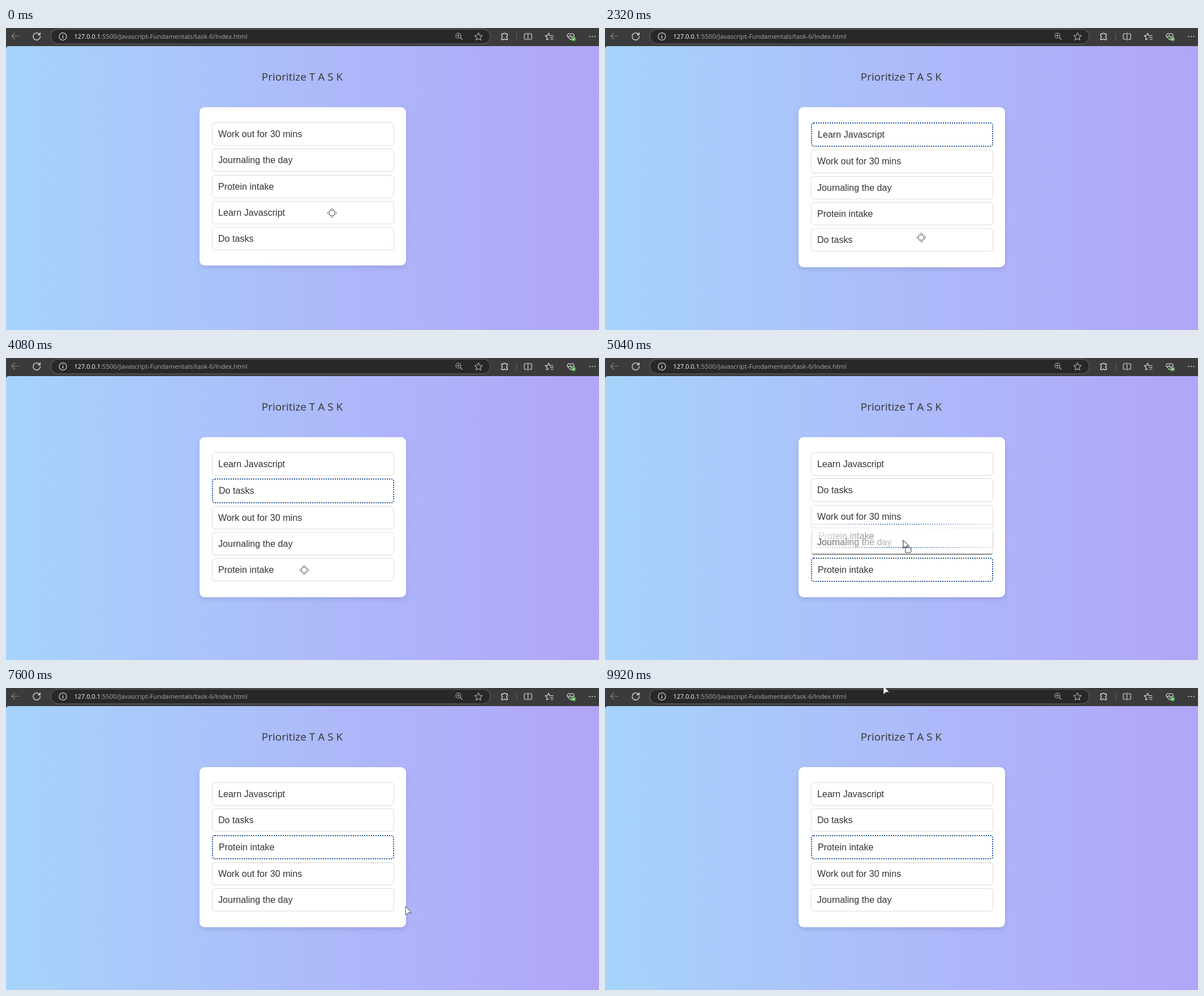
Animation of 1048x534 px, one loop 10 s. Source, as an HTML page:

```html
<!DOCTYPE html>
<html lang="en">
<head>
<meta charset="utf-8">
<title>Prioritize Task</title>
<style>
  html, body { margin: 0; width: 100%; height: 100%; overflow: hidden; background: #3b3b3b; }
  #stage { position: relative; width: 1048px; height: 534px; overflow: hidden; }
  #stage > * { position: absolute; }
  #page { left: 0; top: 32px; width: 1048px; height: 502px; border-radius: 5px 0 0 0;
    background: linear-gradient(to right, #a6d4fb, #adbbfa 50%, #b1a5f8); }
  #card { left: 342px; top: 140px; width: 365px; background: #fff; border-radius: 9px;
    box-shadow: 0 4px 9px rgba(0, 0, 0, .1); }
  .item { left: 364px; width: 321.5px; box-sizing: border-box; padding-left: 10px;
    border: 1px solid #dcdcdc; border-radius: 5px; background: #fff; color: #333;
    font: 16.1px/39px "Liberation Sans", Arial, sans-serif; white-space: pre; }
  .item.dragged { border: 2px dotted #1d5293; }
  .item.over { border-width: 0 1px 2px; border-bottom-color: #888; }
  svg { left: 0; top: 0; overflow: visible; }
  svg text { font-family: "Open Sans", sans-serif; }
  .icons { fill: none; stroke: #e6e6e6; stroke-width: 1.1; stroke-linecap: round; stroke-linejoin: round; }
</style>
</head>
<body>
<div id="stage">
  <div id="page"></div>
  <svg width="1048" height="534">
    <rect x="79" y="2" width="777" height="26" rx="13" fill="#282828" stroke="#6b6b6b"/>
    <text x="120.5" y="19" font-size="11" fill="#fff">127.0.0.1</text>
    <text x="167" y="19" font-size="11.35" fill="#a9a9a9">:5500/Javascript-Fundamentals/task-6/Index.html</text>
    <g class="icons">
      <path stroke="#858585" d="M23 14.5H10m5.500-5.500L10 14.500l5.500 5.500"/>
      <path stroke-width="1.3" d="M59.500 11.500A6.300 6.300 0 1 0 60.500 15M60.300 8.500v3.500h-3.500"/>
      <circle cx="100.500" cy="15" r="6.500"/>
      <path stroke-width="1.400" d="M100.500 14.500v3.500m0-6.200v.1"/>
      <g stroke="#b5b5b5">
        <circle cx="799.500" cy="13.500" r="4.500"/>
        <path d="M803 17l3.500 3.500M797.500 13.500h4m-2-2v4"/>
        <path d="M835 8.500l2 4.300 4.700.6-3.500 3.200.9 4.700-4.100-2.300-4.100 2.300.9-4.700-3.500-3.200 4.700-.6z"/>
      </g>
      <path stroke-width="1.300" d="M876 10.500h3a2.100 2.100 0 0 1 4 0h3v3.300a2 2 0 0 0 0 3.800v3.100h-3.200a2 2 0 0 0-3.700 0H876v-3.200a2 2 0 0 0 0-3.700z"/>
      <path stroke="#646464" d="M902.500 10v11"/>
      <path d="M920.500 10h-3a1.500 1.500 0 0 0-1.500 1.500v7a1.500 1.500 0 0 0 1.500 1.500h3M924.500 10h3a1.500 1.500 0 0 1 1.500 1.500v7a1.500 1.500 0 0 1-1.500 1.500h-3M922.500 8.500v13"/>
      <path d="M961 13.500l-1.800-4.500-1.900 3.900-4.300.6 3.200 3-.8 4.500 3.600-2M961.500 13.500h5.500m-5.500 3.300h5.500m-4 3.200h4"/>
      <path d="M998 20.800l-5-5a3.500 3.500 0 0 1 5-5 3.500 3.500 0 0 1 5 5zM992.500 15h3l1.500-2 2 4 1.500-2h3"/>
      <circle cx="1003" cy="19.500" r="4" fill="#4fa64d" stroke="none"/>
      <path stroke="#fff" d="M1001.200 19.600l1.300 1.300 2.300-2.500"/>
      <path stroke-width="2" d="M1031.500 15h.01m4.500 0h.01m4.500 0h.01"/>
    </g>
    <text x="451.800" y="93.400" font-size="19" fill="#333">Prioritize T A S K</text>
  </svg>
  <div id="card"></div>
  <svg id="pointer" width="1" height="1" style="z-index:3">
    <path id="arrow" d="M0 0V15.500L4.300 11.500H10.500Z" fill="#fff" stroke="#444"/>
    <g id="drag" fill="#fff" stroke="#111">
      <path d="M0 0v14.500l3.200-3 2.300 5 2.400-1.100-2.200-4.800h4.600z"/>
      <rect x="3.800" y="13.300" width="10" height="9" rx="1.500" stroke-width="1.300" stroke-dasharray="1.700 1"/>
    </g>
    <g id="move" fill="#fff" stroke="#666">
      <rect x="-4.500" y="-4.500" width="9" height="9" rx="2.500" stroke="#bbb"/>
      <path d="M0-8.500l3.300 4h-6.600zM0 8.500l3.300-4h-6.600zM-8.500 0l4-3.300v6.600zM8.500 0l-4-3.300v6.600z"/>
    </g>
  </svg>
</div>
<script>
const LOOP = 10000, STEP = 80;
const TOP = 167, GAP = 5.05, HEIGHT = { '': 41.2, dragged: 43.4, over: 41.9 };
const START_ORDER = ['Work out for 30 mins', 'Journaling the day', 'Protein intake', 'Learn Javascript', 'Do tasks'];
const DRAGS = [
  { name: 'Learn Javascript', start: 120, end: 850, slot: 0 },
  { name: 'Do tasks', start: 2450, end: 3300, slot: 1 },
  { name: 'Protein intake', start: 4500, end: 6350, slot: 2 }
];
// Pointer stops: time, x, y
const STOPS = [
  [0, 576, 327], [120, 576, 326], [560, 580, 185], [1200, 580, 187], [2000, 559, 370.5],
  [2400, 559, 370.5], [2450, 559, 372], [3000, 553, 230], [3500, 553, 232], [4160, 526, 381],
  [4500, 526, 381], [5040, 527, 322], [5200, 527, 285], [6500, 528, 283],
  [7200, 706, 386], [8200, 706, 386], [9300, 492, -4], [LOOP, 492, -4]
];

const $ = id => document.getElementById(id);
const stage = $('stage');

function addItem(name) {
  const el = document.createElement('div');
  el.className = 'item';
  el.textContent = name;
  return stage.appendChild(el);
}
const items = Object.fromEntries(START_ORDER.map(name => [name, addItem(name)]));
const ghost = addItem('');
ghost.className = 'item dragged';
ghost.style.zIndex = 2;
ghost.style.height = HEIGHT.dragged + 'px';

function pointerAt(t) {
  const i = STOPS.findIndex(stop => stop[0] > t);
  const [t0, x0, y0] = STOPS[i - 1], [t1, x1, y1] = STOPS[i];
  const p = (t - t0) / (t1 - t0), ease = p * p * (3 - 2 * p);
  return { x: x0 + (x1 - x0) * ease, y: y0 + (y1 - y0) * ease };
}

function orderAt(t) {
  const order = [...START_ORDER];
  for (const { name, end, slot } of DRAGS) {
    if (t < end) break;
    order.splice(order.indexOf(name), 1);
    order.splice(slot, 0, name);
  }
  return order;
}

function placeGhost(drag, pointer, slot) {
  const grab = pointerAt(drag.start);
  const left = 364 + pointer.x - grab.x;
  const top = TOP + slot * (HEIGHT[''] + GAP) + pointer.y - grab.y;
  const mask = `radial-gradient(circle 200px at ${pointer.x - left}px ${pointer.y - top}px, rgba(0,0,0,.75), transparent)`;
  ghost.textContent = drag.name;
  Object.assign(ghost.style, { left: left + 'px', top: top + 'px', maskImage: mask, webkitMaskImage: mask,
    maskOrigin: 'border-box', webkitMaskOrigin: 'border-box' });
}

function render(t) {
  const pointer = pointerAt(t), order = orderAt(t);
  const latest = DRAGS.filter(d => t >= d.start).pop();
  const active = latest && t < latest.end;
  const hovered = active ? order[Math.floor((pointer.y - 164) / 46.6)] : null;

  let y = TOP;
  for (const name of order) {
    const state = latest && name === latest.name ? 'dragged' : name === hovered ? 'over' : '';
    const el = items[name];
    el.className = 'item ' + state;
    el.style.top = y + 'px';
    el.style.height = HEIGHT[state] + 'px';
    y += HEIGHT[state] + GAP;
  }
  $('card').style.height = y - GAP + 27.2 - 140 + 'px';

  ghost.style.display = active ? '' : 'none';
  if (active) placeGhost(latest, pointer, order.indexOf(latest.name));

  const onList = pointer.x > 364 && pointer.x < 685 && pointer.y > TOP && pointer.y < y - GAP;
  const shape = active ? 'drag' : onList ? 'move' : 'arrow';
  for (const id of ['arrow', 'drag', 'move']) $(id).style.display = id === shape ? '' : 'none';
  $('pointer').style.transform = `translate(${pointer.x}px, ${pointer.y}px)`;
}

const began = performance.now();
function tick() {
  const t = (performance.now() - began) % LOOP;
  render(Math.floor(t / STEP) * STEP);
  requestAnimationFrame(tick);
}
tick();
</script>
</body>
</html>
```
